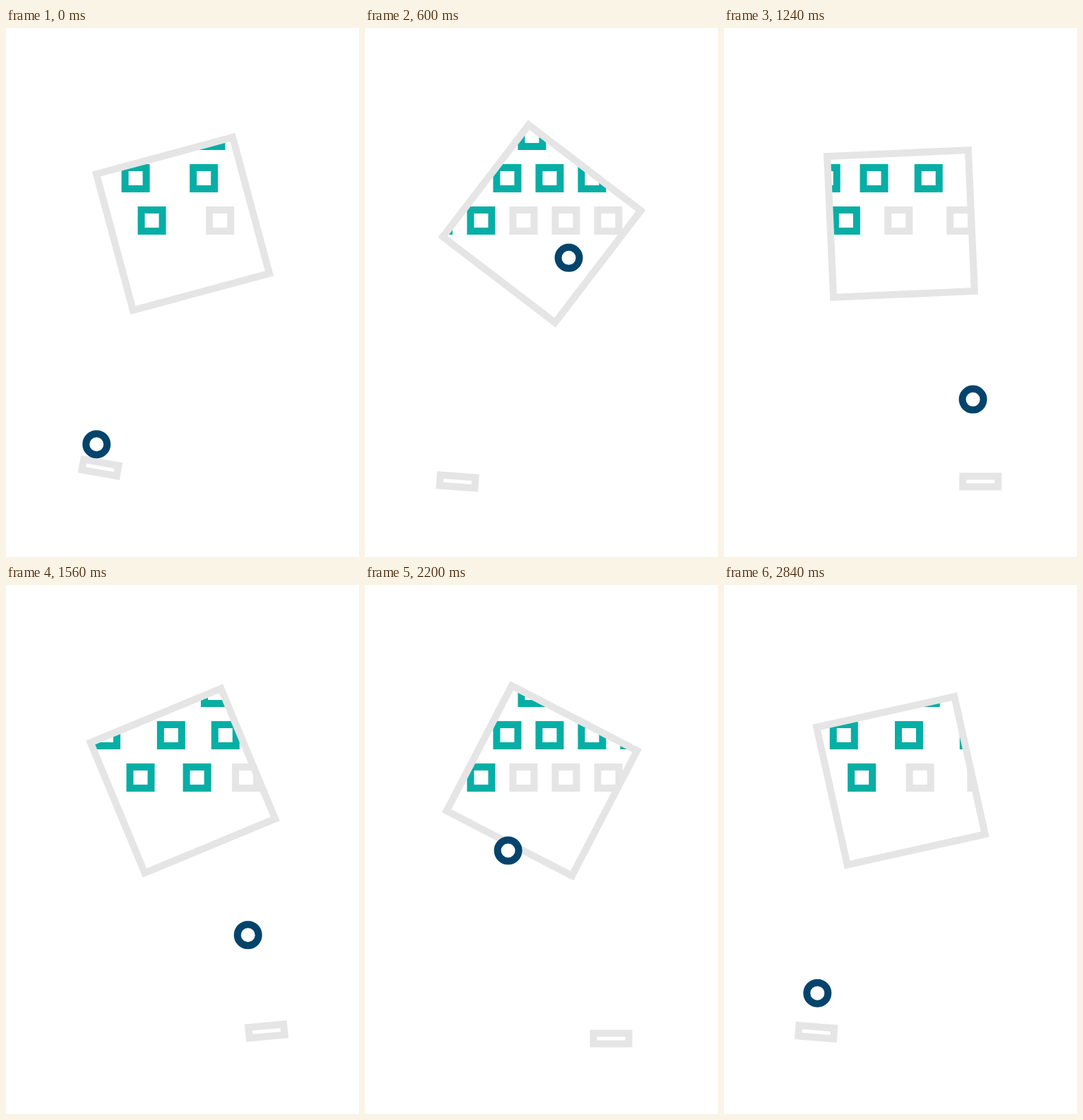
Write an HTML page that moves like this. It is 500x750 px and loops after 2880 ms.

```html
<!DOCTYPE html>
<html lang="en">
<head>
<meta charset="utf-8">
<title>Brick breaker loop</title>
<style>
  html, body { margin: 0; width: 100%; height: 100%; overflow: hidden; background: #fff; }
  svg { display: block; width: 100%; height: 100%; }
</style>
</head>
<body>
<svg id="stage" viewBox="0 0 500 750" fill="none" stroke-width="10">
  <clipPath id="inside"><rect id="hole" x="-100" y="-100" width="200" height="200"/></clipPath>
  <g id="bricks" clip-path="url(#inside)"></g>
  <rect id="box" x="-100" y="-100" width="200" height="200" stroke="#e5e5e5"/>
  <rect id="paddle" x="-25" y="-7.5" width="50" height="15" stroke="#e5e5e5"/>
  <circle id="ball" r="15" fill="#fff" stroke="#04446c"/>
</svg>
<script>
const LOOP = 2880, HALF = LOOP / 2;
const TEAL = '#06aea5', GRAY = '#e5e5e5';
const GAP = 60, SHIFT = 2, DELAY = 80;

const $ = id => document.getElementById(id);
const clamp = v => Math.min(1, Math.max(0, v));
const easeInOut = (v, power) => {
  v = clamp(v);
  return v < .5 ? .5 * (2 * v) ** power : 1 - .5 * (2 - 2 * v) ** power;
};

// Each move carries a row two columns to the right: [start, duration].
const rows = [
  { y: 153, x: 176.5, moves: [[-660, 920], [780, 920], [2220, 920]] },
  { y: 213, x: 201.5, moves: [[-500, 920], [940, 920], [2380, 920]] },
  { y: 273, x: 224.5, moves: [[-500, 920], [880, 920], [2220, 1280]] }
];
// Hit times of bricks in the bottom row, by column number
const hits = { '-2': 360, '-1': 560, '-3': 1800, '-4': 2000 };

// Ball corners: [time, x, y]
const path = [
  [0, 128, 591], [360, 220, 313], [440, 220, 355], [560, 284.5, 313],
  [1440, 372.5, 589], [1800, 284, 313], [1880, 280, 351.5], [2000, 224.8, 313],
  [2880, 128, 591]
];

const bricks = [];
rows.forEach((row, r) => {
  for (let col = -9; col <= 4; col++) {
    const el = document.createElementNS('http://www.w3.org/2000/svg', 'rect');
    el.setAttribute('width', 30);
    el.setAttribute('height', 30);
    el.setAttribute('y', row.y - 15);
    $('bricks').append(el);
    const hit = r < 2 ? Infinity : col >= 0 ? 0 : hits[col] ?? Infinity;
    bricks.push({ el, row, col, hit });
  }
});

function brickX({ row, col }, t) {
  return row.moves.reduce((x, [start, length], i) => {
    const begin = start - DELAY * (col + SHIFT * i);
    return x + SHIFT * GAP * easeInOut((t - begin) / length, 4);
  }, row.x + GAP * col);
}

function ballAt(t) {
  const i = path.findIndex(p => p[0] > t);
  const [t0, x0, y0] = path[i - 1], [t1, x1, y1] = path[i];
  const k = (t - t0) / (t1 - t0);
  return [x0 + (x1 - x0) * k, y0 + (y1 - y0) * k];
}

function paddleAt(t) {
  const c = t % HALF, first = t < HALF, dir = first ? 1 : -1;
  const settle = clamp(1 - c / 440) ** 2;
  const windUp = clamp(1 - (HALF - c) / 120) ** 2;
  const tiltBack = first ? (1 + Math.cos(Math.PI * clamp(c / 1120))) / 2 : settle;
  const x = 250 + dir * (240 * easeInOut((c - 505) / 910, 3) - 120);
  return { x, tilt: 10 * dir * (tiltBack - windUp), lift: 20 * (settle + windUp) };
}

function draw(t) {
  const turn = `translate(250.5 277.5) rotate(${-15 - t * 180 / LOOP})`;
  $('box').setAttribute('transform', turn);
  $('hole').setAttribute('transform', turn);

  for (const b of bricks) {
    b.el.setAttribute('x', brickX(b, t) - 15);
    b.el.setAttribute('stroke', t >= b.hit ? GRAY : TEAL);
  }

  const p = paddleAt(t);
  $('paddle').setAttribute('transform',
    `translate(${p.x} 643) rotate(${p.tilt}) translate(0 ${-p.lift})`);

  const [x, y] = ballAt(t);
  $('ball').setAttribute('cx', x);
  $('ball').setAttribute('cy', y);
}

const begin = performance.now();
function tick() {
  draw((performance.now() - begin) % LOOP);
  requestAnimationFrame(tick);
}
tick();
</script>
</body>
</html>
```
